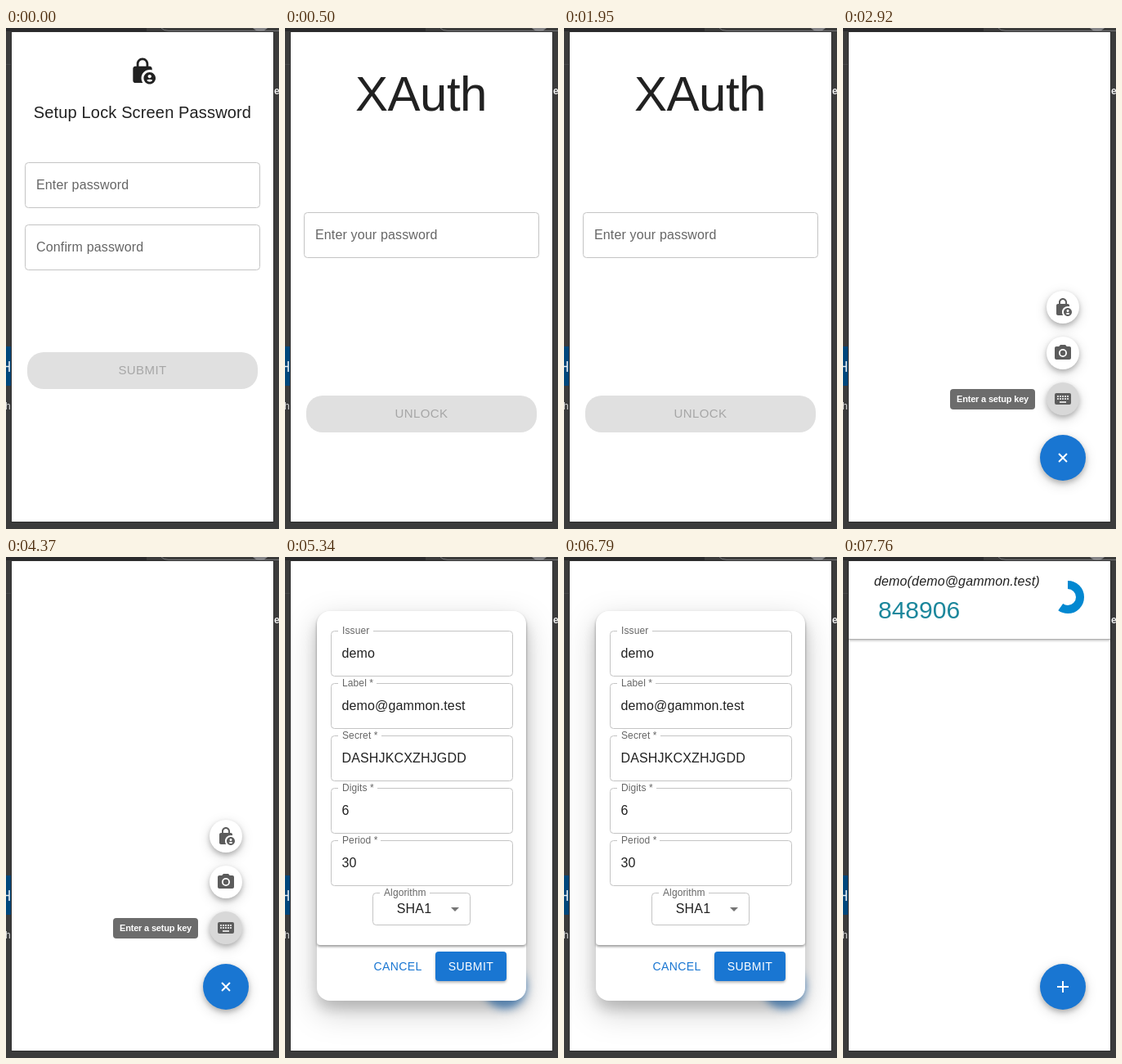
These frames come from a looping animation (334x612 px, 8 s). An HTML page:

```html
<!DOCTYPE html>
<html lang="en">
<head>
<meta charset="utf-8">
<title>Authenticator setup</title>
<style>
html, body { margin: 0; width: 100%; height: 100%; overflow: hidden; background: #3b3b3b; }
svg { display: block; width: 334px; height: 612px; font-family: "Liberation Sans", Arial, sans-serif; }
.body { font-size: 16px; letter-spacing: .15px; }
.small { font-size: 12px; letter-spacing: .11px; }
.big { font-size: 15px; letter-spacing: .43px; }
.btn { font-size: 14px; letter-spacing: .4px; }
.fab { filter: drop-shadow(0 3px 3px rgba(0,0,0,.22)) drop-shadow(0 4px 7px rgba(0,0,0,.16)); }
.dialog { filter: drop-shadow(0 10px 8px rgba(0,0,0,.16)) drop-shadow(0 12px 18px rgba(0,0,0,.2)); }
.sheet { filter: drop-shadow(0 2px 1.5px rgba(0,0,0,.4)); }
.raised { filter: drop-shadow(0 2px 1.5px rgba(0,0,0,.28)); }
</style>
</head>
<body>
<svg id="stage" viewBox="0 0 334 612"></svg>
<script>
const INK = '#212121', GREY = '#666', BLUE = '#1976d2', LINE = '#c4c4c4';
const EMAIL = 'demo@gammon.test';
const LOOP = 8000;

const LOCK = 'M18 11c.7 0 1.37.1 2 .29V10c0-1.1-.9-2-2-2h-1V6c0-2.76-2.24-5-5-5S7 3.24 7 6v2H6c-1.1 0-2 .9-2 2v10c0 1.1.9 2 2 2h6.26C11.47 20.87 11 19.49 11 18c0-3.87 3.13-7 7-7zM8.9 6c0-1.71 1.39-3.1 3.1-3.1s3.1 1.39 3.1 3.1v2H8.9V6z' +
  'M18 13c-2.76 0-5 2.24-5 5s2.24 5 5 5 5-2.24 5-5-2.24-5-5-5zm0 2c.83 0 1.5.67 1.5 1.5S18.83 18 18 18s-1.5-.67-1.5-1.5.67-1.5 1.5-1.5zm0 6c-1.03 0-1.94-.52-2.48-1.32.73-.42 1.57-.68 2.48-.68s1.75.26 2.48.68C19.94 20.48 19.03 21 18 21z';
const CAMERA = 'M9 2L7.17 4H4c-1.1 0-2 .9-2 2v12c0 1.1.9 2 2 2h16c1.1 0 2-.9 2-2V6c0-1.1-.9-2-2-2h-3.17L15 2H9z' +
  'M12 17a5 5 0 1 1 0-10a5 5 0 1 1 0 10zM12 8.8a3.2 3.2 0 1 0 0 6.4a3.2 3.2 0 1 0 0-6.4z';
const key = (x, y) => `M${x} ${y}h2v2h-2z`;
const KEYBOARD = 'M4 5h16a2 2 0 0 1 2 2v10a2 2 0 0 1-2 2H4a2 2 0 0 1-2-2V7a2 2 0 0 1 2-2zM8 15h8v2H8z' +
  [5, 8, 11, 14, 17].map(x => key(x, 8) + key(x, 11)).join('');

const text = (x, y, str, fill, cls = 'body', more = '') =>
  `<text x="${x}" y="${y}" fill="${fill}" class="${cls}" ${more}>${str}</text>`;
const mid = (x, y, str, fill, cls, more = '') =>
  text(x, y, str, fill, cls, 'text-anchor="middle" ' + more);
const rect = (x, y, w, h, fill, r = 0, more = '') =>
  `<rect x="${x}" y="${y}" width="${w}" height="${h}" rx="${r}" fill="${fill}" ${more}/>`;
const icon = (d, x, y, size, fill) =>
  `<path d="${d}" fill="${fill}" fill-rule="evenodd" transform="translate(${x} ${y}) scale(${size / 24})"/>`;
const outline = (x, y, w, h) =>
  rect(x + .5, y + .5, w - 1, h - 1, 'none', 4, `stroke="${LINE}"`);

const input = (y, label) => outline(23, y, 288, 56) + text(37, y + 33, label, GREY);
const wideButton = (y, label) =>
  rect(26, y, 282, 45, '#e0e0e0', 20) + mid(167, y + 27, label, '#a6a6a6', 'big');
const field = (y, label, notch, value) =>
  outline(56, y, 223, 56) + rect(65, y - 1, notch, 3, '#fff') +
  text(70, y + 4, label, GREY, 'small') + text(69.5, y + 33, value, INK);

const fab = angle =>
  `<circle class="fab" cx="269" cy="525" r="28" fill="${BLUE}"/>` +
  `<path d="M-7 0H7M0-7V7" stroke="#fff" stroke-width="2" transform="translate(269 525) rotate(${angle})"/>`;
const action = (y, d, fill = '#fff') =>
  `<circle class="fab" cx="269" cy="${y}" r="20" fill="${fill}"/>` + icon(d, 257, y - 12, 24, '#5c5c5c');

const backdrop =
  rect(0, 0, 334, 612, '#3b3b3b') +
  rect(0, 0, 172, 4, '#2a2a2c') +
  '<path d="M190 0q3 3.5 9 3.5H334" fill="none" stroke="#77777a"/>' +
  '<circle cx="311" cy="-8" r="12" fill="#858588"/>' +
  rect(0, 44, 7, 1, '#484848') +
  rect(0, 389, 7, 48, '#00477b') +
  '<path d="M0 413.5H4M4 407V420" stroke="#e8eef4" stroke-width="1.6" fill="none"/>' +
  text(-1, 466, 'h', '#ddd', 'small') +
  text(328, 81, 'e', '#f2f2f2', 'small', 'font-weight="bold"') +
  rect(6, 4, 322, 600, '#2f2f2f') +
  rect(7, 5, 320, 598, '#fff');

const setup =
  icon(LOCK, 149.5, 35, 35, INK) +
  mid(167, 110, 'Setup Lock Screen Password', INK, '', 'font-size="20" letter-spacing=".15"') +
  input(164, 'Enter password') + input(240, 'Confirm password') +
  wideButton(396, 'SUBMIT');

const unlock =
  mid(166.5, 101, 'XAuth', INK, '', 'font-size="60" letter-spacing="-.5"') +
  input(225, 'Enter your password') + wideButton(449, 'UNLOCK');

const menu =
  action(341, LOCK) + action(397, CAMERA) + action(453, KEYBOARD, '#d8d8d8') +
  rect(131, 441, 104, 25, '#6c6c6c', 4) +
  text(139, 457, 'Enter a setup key', '#fff', '', 'font-size="11" font-weight="bold" letter-spacing="-.18"') +
  fab(45);

const form =
  `<circle cx="269" cy="525" r="27" fill="${BLUE}" opacity=".6" style="filter:blur(5px)"/>` +
  rect(39, 66, 256, 476, '#fff', 16, 'class="dialog"') +
  '<path class="sheet" d="M39 82a16 16 0 0 1 16-16H279a16 16 0 0 1 16 16V470a4 4 0 0 1-4 4H43a4 4 0 0 1-4-4z" fill="#fff"/>' +
  field(90, 'Issuer', 43, 'demo') +
  field(154, 'Label *', 47, EMAIL) +
  field(218, 'Secret *', 53, 'DASHJKCXZHJGDD') +
  field(282, 'Digits *', 48, '6') +
  field(346, 'Period *', 52, '30') +
  outline(107, 410, 120, 40) + rect(116, 409, 61, 3, '#fff') +
  text(121, 414, 'Algorithm', GREY, 'small') +
  mid(158, 435, 'SHA1', INK, 'body') +
  '<path d="M203 428h10l-5 5z" fill="#757575"/>' +
  mid(138, 505, 'CANCEL', BLUE, 'btn') +
  rect(184, 482, 87, 36, BLUE, 4, 'class="raised"') +
  mid(227.5, 505, 'SUBMIT', '#fff', 'btn');

// The ring is a dashed circle that starts at the top; 60 % is left.
const codes =
  rect(7, 5, 320, 95, '#fff', 0, 'class="raised"') + rect(7, 100, 320, 1, '#b0b0b0') +
  text(38, 35, `demo(${EMAIL})`, INK, 'body', 'font-style="italic"') +
  text(43, 75, '848906', '#1c879c', '', 'font-size="30"') +
  '<circle cx="275" cy="49" r="15" fill="none" stroke="#0288d1" stroke-width="10" pathLength="100" stroke-dasharray="60 100" transform="rotate(-90 275 49)"/>' +
  fab(0);

const scenes = [[0, setup], [500, unlock], [2920, menu], [5340, form], [7760, codes]];
const stage = document.getElementById('stage');
stage.innerHTML = backdrop + scenes.map(([, art]) => `<g display="none">${art}</g>`).join('');
const groups = [...stage.children].slice(-scenes.length);

function render(ms) {
  const t = ms % LOOP;
  const current = scenes.filter(([start]) => t >= start).length - 1;
  groups.forEach((g, i) => g.setAttribute('display', i === current ? 'inline' : 'none'));
}

const begin = performance.now();
function tick() {
  render(performance.now() - begin);
  requestAnimationFrame(tick);
}
tick();
</script>
</body>
</html>
```
